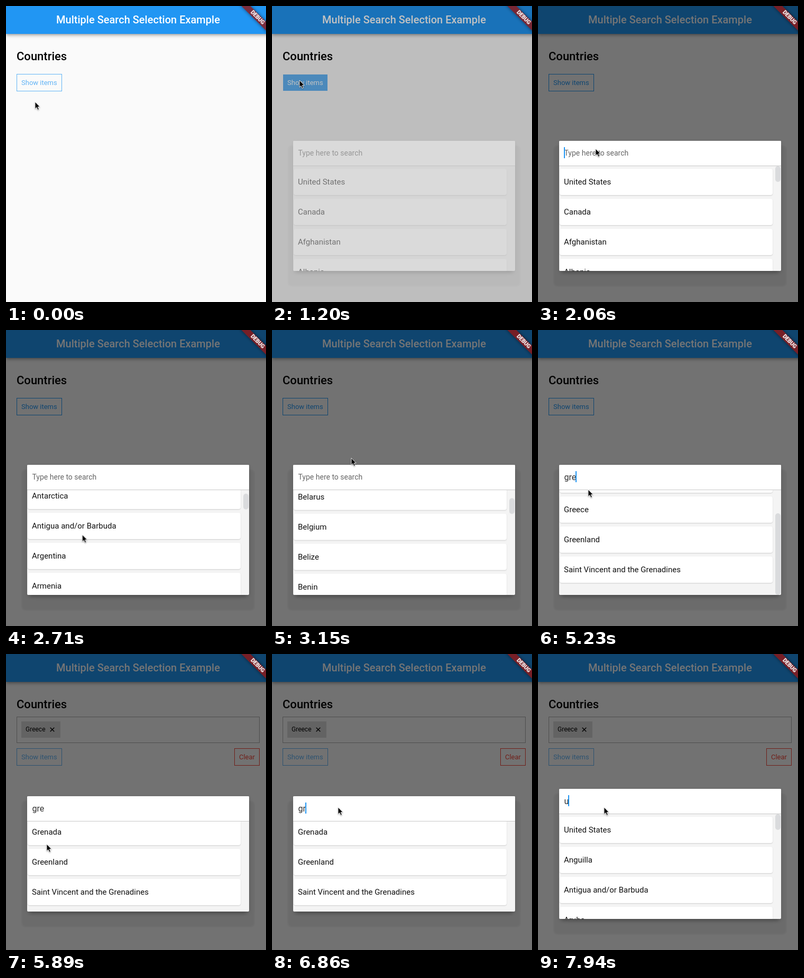
Animation of 492x562 px, one loop 8000 ms. Source, as an HTML page:

```html
<!DOCTYPE html>
<html lang="en">
<head>
<meta charset="utf-8">
<title>Multiple Search Selection Example</title>
<style>
  html, body { margin: 0; width: 100%; height: 100%; overflow: hidden; }
  body { position: relative; background: #fafafa; font-family: Roboto, Arial, sans-serif; }
  body *, body *::before { box-sizing: border-box; }
  .abs, .abs > * { position: absolute; }

  /* Every animation shares one 8 s loop; 1% = 80 ms. */
  .anim { animation: 8s infinite both; }
  .cut { animation-timing-function: step-end; }
  .even { animation-timing-function: linear; }
  .soft { animation-timing-function: ease-in-out; }

  /* Page */
  header {
    position: absolute; left: 0; top: 0; width: 500px; height: 53px;
    background: #2196f3; color: #fff; font: 500 20px/52px Roboto, Arial, sans-serif; text-align: center;
    box-shadow: 0 2px 4px -1px rgba(0,0,0,.2), 0 4px 5px rgba(0,0,0,.14), 0 1px 10px rgba(0,0,0,.12);
  }
  h1 { position: absolute; left: 20px; top: 82px; margin: 0; font: 500 22px/27px Roboto, Arial, sans-serif; color: #000; }
  .btn {
    height: 33px; padding: 0 8px; border: 1px solid; font-size: 13px; line-height: 31px;
    white-space: nowrap; color: #62b4f5; background-clip: padding-box;
  }
  .first { left: 20px; top: 129px; animation-name: hover; }
  .before { animation-name: before; }
  .after { animation-name: after; }
  .picked { left: 20px; top: 119px; width: 460px; height: 50px; border: 1px solid #aaa; }
  .chip { left: 29px; top: 128px; width: 74px; height: 31px; padding-left: 8px; background: #d9d9d9; font-size: 12px; line-height: 31px; }
  .chip svg { position: absolute; left: 54px; top: 11px; }
  .again { left: 20px; top: 179px; }
  .clear { left: 432px; top: 179px; color: #f44336; }
  @keyframes hover {
    0%, 6% { background-color: rgba(98,180,245,0); color: #62b4f5; border-color: #62b4f5; }
    9%, 15.2% { background-color: #62b4f5; color: #fff; border-color: rgba(98,180,245,0); }
    18%, 100% { background-color: rgba(98,180,245,0); color: #2196f3; border-color: #2196f3; }
  }
  @keyframes before { 0% { opacity: 1 } 70.75% { opacity: 0 } }
  @keyframes after { 0% { opacity: 0 } 70.75% { opacity: 1 } }

  /* Dialog */
  .barrier { position: absolute; inset: 0; background: rgba(0,0,0,.54); animation-name: open; }
  .fade { position: absolute; inset: 0; animation-name: open; }
  @keyframes open {
    0%, 14.89% { opacity: 0 }
    14.9%, 15.1% { opacity: .44 }
    16.9%, 100% { opacity: 1 }
  }
  .dialog {
    position: absolute; left: 40px; width: 420px; border-radius: 2px; background: #f4f4f4;
    box-shadow: 0 8px 7px -5px rgba(0,0,0,.24), 0 3px 8px rgba(0,0,0,.12), 0 19px 3px 10px rgba(0,0,0,.06);
    animation-name: resize;
  }
  @keyframes resize {
    0% { top: 256px; height: 247px }
    70.75% { top: 270px; height: 219px }
    88% { top: 256px; height: 247px }
  }
  .field { position: absolute; inset: 0 0 auto; height: 48px; background: #fff; border-bottom: 1px solid #c8c8c8; border-radius: 2px 2px 0 0; }
  .field p { position: absolute; left: 9.5px; top: 0; margin: 0; font-size: 16px; line-height: 47px; color: #333; white-space: nowrap; }
  .field .hint { font-size: 14px; color: #666; }
  .caret { position: absolute; top: 12px; width: 2px; height: 21px; margin-left: -1px; background: #2196f3; animation-name: caret; }
  @keyframes caret {
    0% { opacity: 0 } 25% { opacity: 1 } 28.5% { opacity: 0 }
    52.5% { opacity: 1 } 69.5% { opacity: 0 } 80.875% { opacity: 1 }
  }

  .view { position: absolute; inset: 48px 0 0; overflow: hidden; border-radius: 0 0 2px 2px; }
  ul { position: absolute; left: 1px; top: 5px; width: 403px; margin: 0; padding: 0; list-style: none; }
  li {
    height: 50px; margin-bottom: 7px; padding-left: 8px; border-radius: 4px; background: #fff;
    font-size: 15px; line-height: 50px; color: #111; box-shadow: 0 1px 2px rgba(0,0,0,.16);
  }

  /* What is typed and which list it gives */
  .s-all { animation-name: all; }
  .s-g { animation-name: g; }
  .s-gr { animation-name: gr; }
  .s-gre { animation-name: gre; }
  .s-u { animation-name: u; }
  .s-found { animation-name: found; }
  .s-left { animation-name: left; }
  @keyframes all { 0% { opacity: 1 } 56.75% { opacity: 0 } 90.25% { opacity: 1 } 97.75% { opacity: 0 } }
  @keyframes g { 0% { opacity: 0 } 56.75% { opacity: 1 } 58.625% { opacity: 0 } 88% { opacity: 1 } 90.25% { opacity: 0 } }
  @keyframes gr { 0% { opacity: 0 } 58.625% { opacity: 1 } 60.5% { opacity: 0 } 85.75% { opacity: 1 } 88% { opacity: 0 } }
  @keyframes gre { 0% { opacity: 0 } 60.5% { opacity: 1 } 85.75% { opacity: 0 } }
  @keyframes u { 0% { opacity: 0 } 97.75% { opacity: 1 } }
  @keyframes found { 0% { opacity: 0 } 58.625% { opacity: 1 } 70.75% { opacity: 0 } }
  @keyframes left { 0% { opacity: 0 } 70.75% { opacity: 1 } 88% { opacity: 0 } }

  /* Scrolling */
  .fling { --k: -1; animation-name: fling; }
  @keyframes fling {
    0%, 28.125% { transform: translateY(0) }
    31% { transform: translateY(calc(var(--k) * 290px)) }
    32.75% { transform: translateY(calc(var(--k) * 480px)) }
    34.5% { transform: translateY(calc(var(--k) * 560px)) }
    37% { transform: translateY(calc(var(--k) * 930px)) }
    39.375% { transform: translateY(calc(var(--k) * 1214px)) }
    42.625%, 56.75% { transform: translateY(calc(var(--k) * 1300px)) }
    56.76%, 100% { transform: translateY(0) }
  }
  .pull { animation-name: pull; }
  @keyframes pull {
    0%, 62.5% { transform: translateY(0) }
    65.2%, 65.5% { transform: translateY(-50px) }
    67.5%, 100% { transform: translateY(-38px) }
  }
  .rest { top: -5px; }
  .bar { position: absolute; inset: 0; }
  .bar i { position: absolute; right: 1px; top: 0; width: 10px; height: 30px; border-radius: 5px; background: #dadbdd; }
  .bar .fling { --k: .0126; }
  .long { animation-name: long; }
  .s-bar { animation-name: bar; }
  @keyframes bar {
    0%, 17% { opacity: 0 }
    20%, 58.62% { opacity: 1 }
    58.625%, 87.99% { opacity: 0 }
    88%, 100% { opacity: 1 }
  }
  @keyframes long {
    0%, 62.5% { top: 0; height: 167px }
    65.2%, 65.5% { top: 44px; height: 155px }
    67.5%, 100% { top: 32px; height: 167px }
  }

  /* Overlays */
  .ribbon {
    position: absolute; left: 500px; top: -2px; width: 80px; height: 12px;
    transform-origin: 0 0; transform: rotate(45deg) translate(-40px, 28px);
    background: linear-gradient(rgba(183,28,28,.63), rgba(183,28,28,.63)) rgba(0,0,0,.5);
    box-shadow: 0 0 6px rgba(0,0,0,.5);
    color: #fff; font: 900 10.2px/12px Roboto, Arial, sans-serif; text-align: center;
  }
  .pointer { position: absolute; left: -1px; top: -1px; filter: drop-shadow(0 1px 1px rgba(0,0,0,.35)); animation-name: point; }
  @keyframes point {
    0%, 3.25% { transform: translate(55px, 182px) }
    7.75%, 22.375% { transform: translate(52px, 141px) }
    25.5%, 26% { transform: translate(109px, 271px) }
    28.125% { transform: translate(128px, 420px) }
    31%, 32% { transform: translate(140px, 132px) }
    34.5% { transform: translate(145px, 425px) }
    37% { transform: translate(150px, 134px) }
    39.375% { transform: translate(150px, 243px) }
    42.625% { transform: translate(124px, 444px) }
    43.375%, 46.625% { transform: translate(123px, 444px) }
    52%, 61.25% { transform: translate(124px, 272px) }
    62.5% { transform: translate(100px, 385px) }
    65.2%, 67% { transform: translate(95px, 303px) }
    70%, 73.7% { transform: translate(77px, 361px) }
    76.875% { transform: translate(122px, 307px) }
    79%, 80.8% { transform: translate(123px, 291px) }
    81.25%, 100% { transform: translate(125px, 291px) }
  }
</style>
</head>
<body>
  <header>Multiple Search Selection Example</header>
  <h1>Countries</h1>
  <div class="abs before anim cut"><div class="btn first anim even">Show items</div></div>
  <div class="abs after anim cut">
    <div class="picked"></div>
    <div class="chip">Greece
      <svg width="9" height="9" stroke="#000" stroke-width="1.4"><path d="M.7 .7 8.3 8.3M8.3 .7 .7 8.3"/></svg>
    </div>
    <div class="btn again">Show items</div>
    <div class="btn clear">Clear</div>
  </div>

  <div class="barrier anim even"></div>
  <div class="fade anim even">
    <div class="dialog anim cut">
      <div class="field">
        <p class="hint s-all anim cut"><span class="caret anim cut"></span>Type here to search</p>
        <p class="s-g anim cut">g<span class="caret anim cut"></span></p>
        <p class="s-gr anim cut">gr<span class="caret anim cut"></span></p>
        <p class="s-gre anim cut">gre<span class="caret anim cut"></span></p>
        <p class="s-u anim cut">u<span class="caret anim cut"></span></p>
      </div>
      <div class="view">
        <div class="s-all anim cut">
          <ul class="fling anim even">
            <li>United States<li>Canada<li>Afghanistan<li>Albania<li>Algeria<li>American Samoa<li>Andorra
            <li>Angola<li>Anguilla<li>Antarctica<li>Antigua and/or Barbuda<li>Argentina<li>Armenia<li>Aruba
            <li>Australia<li>Austria<li>Azerbaijan<li>Bahamas<li>Bahrain<li>Bangladesh<li>Barbados
            <li>Belarus<li>Belgium<li>Belize<li>Benin<li>Bermuda<li>Bhutan<li>Bolivia
          </ul>
        </div>
        <ul class="s-g anim cut"><li>Afghanistan<li>Algeria<li>Angola<li>Anguilla</ul>
        <div class="s-found anim cut">
          <ul class="pull anim soft"><li>Grenada<li>Greece<li>Greenland<li>Saint Vincent and the Grenadines</ul>
        </div>
        <ul class="rest s-left anim cut"><li>Grenada<li>Greenland<li>Saint Vincent and the Grenadines</ul>
        <ul class="s-u anim cut"><li>United States<li>Anguilla<li>Antigua and/or Barbuda<li>Aruba</ul>
        <div class="bar s-bar anim even"><i class="fling anim even"></i></div>
        <div class="bar s-found anim cut"><i class="long anim soft"></i></div>
      </div>
    </div>
  </div>

  <div class="ribbon">DEBUG</div>
  <svg class="pointer anim soft" width="13" height="19">
    <path d="M1 1V14.2L4 11.5 6.1 16.3 8.4 15.3 6.3 10.6H10.2Z" fill="#000" stroke="#fff" stroke-width=".9"/>
  </svg>
</body>
</html>
```
